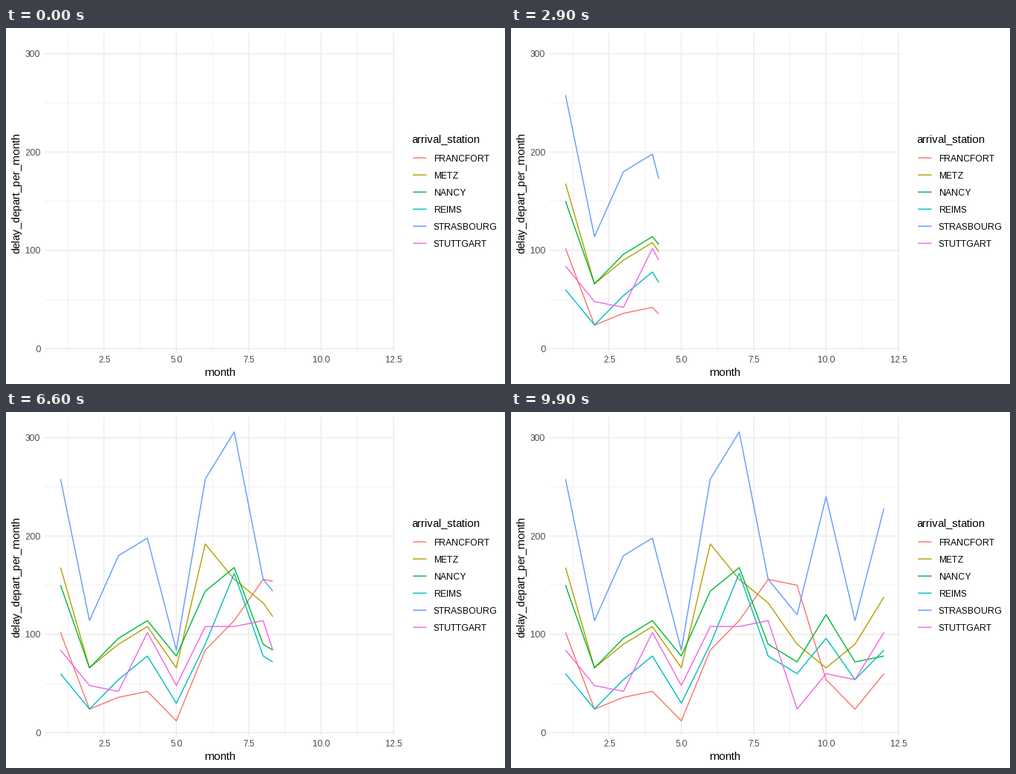
Animation, 672 px wide and 480 px high, one loop 10 s. Source, as a matplotlib script:

```python
import matplotlib.pyplot as plt
import numpy as np
from matplotlib.animation import FuncAnimation
from matplotlib.lines import Line2D

W, H, DPI = 672, 480, 96
FRAMES = 100
PX = 72 / DPI
GRID, TICK = "#EBEBEB", "#4D4D4D"
TITLE_SIZE, TEXT_SIZE = 11, 8.8
LEFT, RIGHT, TOP, BOTTOM = 52.0, 523.7, 7.33, 435.98

plt.rcParams.update({
    "font.family": "Liberation Sans",
    "text.hinting_factor": 1,
    "toolbar": "None",
})

MONTHS = np.arange(1, 13)
STATIONS = {
    "FRANCFORT": ("#F8766D", [102, 24, 36, 42, 12, 84, 114, 156, 150, 54, 24, 60]),
    "METZ": ("#B79F00", [168, 66, 90, 108, 66, 192, 156, 132, 90, 66, 90, 138]),
    "NANCY": ("#00BA38", [150, 66, 96, 114, 78, 144, 168, 90, 72, 120, 72, 78]),
    "REIMS": ("#00BFC4", [60, 24, 54, 78, 30, 90, 162, 78, 60, 96, 54, 84]),
    "STRASBOURG": ("#619CFF", [258, 114, 180, 198, 84, 258, 306, 156, 120, 240, 114, 228]),
    "STUTTGART": ("#F564E3", [84, 48, 42, 102, 48, 108, 108, 114, 24, 60, 54, 102]),
}

fig = plt.figure(figsize=(W / DPI, H / DPI), dpi=DPI, facecolor="white")
ax = fig.add_axes([LEFT / W, 1 - BOTTOM / H, (RIGHT - LEFT) / W, (BOTTOM - TOP) / H])
ax.set(xlim=(0.45, 12.55), ylim=(-2.7, 320.7))
ax.axis("off")


def label(x, y, text, size=TEXT_SIZE, color="black", **kw):
    """Text on a baseline given in pixels from the top left corner."""
    kw = {"va": "baseline", **kw}
    fig.text(x, H - y, text, size=size, color=color, transform=None, **kw)


def grid(xs, ys, width):
    style = dict(color=GRID, lw=width * PX, snap=False, zorder=1)
    for y in ys:
        ax.axhline(y, **style)
    for x in xs:
        ax.axvline(x, **style)


def x_px(month):
    return LEFT + (month - 0.45) / 12.1 * (RIGHT - LEFT)


def y_px(delay):
    return BOTTOM - (delay + 2.7) / 323.4 * (BOTTOM - TOP)


x_ticks, y_ticks = np.arange(2.5, 13, 2.5), np.arange(0, 301, 100)
grid(np.arange(1.25, 12, 2.5), np.arange(50, 300, 100), 0.71)
grid(x_ticks, y_ticks, 1.42)

for x in x_ticks:
    label(x_px(x), 451, f"{x:.1f}", color=TICK, ha="center")
for y in y_ticks:
    label(46, round(y_px(y) + 4.2), str(y), color=TICK, ha="right")
label(288, 469, "month", TITLE_SIZE, ha="center")
label(18, 222, "delay_depart_per_month", TITLE_SIZE, rotation=90,
      rotation_mode="anchor", ha="center")

label(546, 154, "arrival_station", TITLE_SIZE)
lines = []
for i, (name, (color, delays)) in enumerate(STATIONS.items()):
    y = 175.1 + 23.04 * i
    style = dict(color=color, lw=1.42 * PX, solid_capstyle="butt",
                 solid_joinstyle="round", snap=False)
    fig.add_artist(Line2D([548, 566.4], [H - y] * 2, transform=None, **style))
    label(576, round(y + 4.4), name)
    lines.append(ax.plot([], [], zorder=2 + i, **style)[0])


def update(frame):
    now = 1 + 11 * frame / (FRAMES - 1)
    past = MONTHS[MONTHS < now]
    xs = np.append(past, now) if frame else []
    for line, (_, delays) in zip(lines, STATIONS.values()):
        line.set_data(xs, np.interp(xs, MONTHS, delays) if frame else [])
    return lines


anim = FuncAnimation(fig, update, frames=FRAMES, interval=100,
                     repeat=True, repeat_delay=0, blit=False)
plt.show()
```
